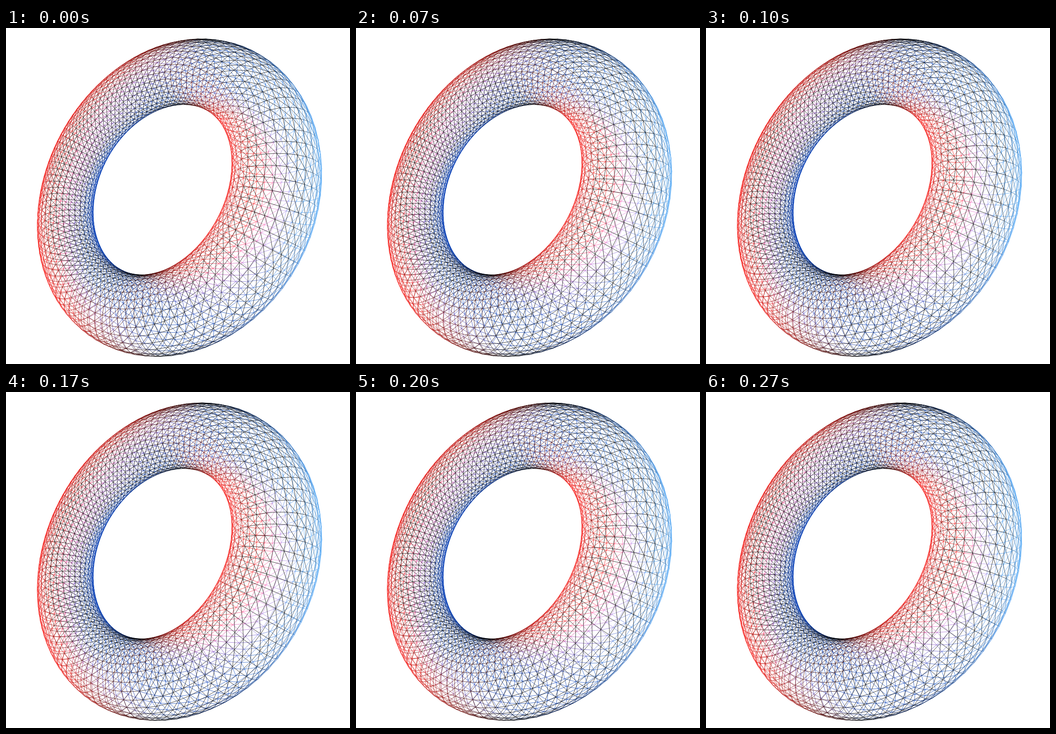
An HTML page with a canvas for the animation above (310 ms loop, 757 px wide and 740 px high).

```html
<!DOCTYPE html>
<html lang="en">
<head>
<meta charset="utf-8">
<title>Wireframe torus</title>
<style>
html, body { margin: 0; width: 100%; height: 100%; overflow: hidden; background: #fff; }
canvas { display: block; }
</style>
</head>
<body>
<canvas id="stage" width="757" height="740"></canvas>
<script>
const ctx = document.getElementById('stage').getContext('2d');
const TAU = 2 * Math.PI;

const LOOP = 310;
const STEPS = [0, 30, 70, 100, 130, 170, 200, 230, 270];

// Torus with ring radius 1, seen by a perspective camera on the z axis.
const RING = 94, TUBE = 30, TUBE_RADIUS = 0.263, PHASE = -0.21;
const DISTANCE = 2.6, FOCAL = 696, CENTER_X = 313, CENTER_Y = 338.7;
const TILT = 41.4 * Math.PI / 180, TURN = 27.6 * Math.PI / 180;

const cosTilt = Math.cos(TILT), sinTilt = Math.sin(TILT);
const cosTurn = Math.cos(TURN), sinTurn = Math.sin(TURN);
const nearAxis = [cosTilt * cosTurn, -cosTilt * sinTurn, sinTilt];
const sideAxis = [sinTurn, cosTurn, 0];
const spinAxis = [-sinTilt * cosTurn, sinTilt * sinTurn, cosTilt];

const clamp = (x, lo = 0, hi = 1) => Math.min(hi, Math.max(lo, x));
const mix = (a, b, t) => a + (b - a) * t;
const combine = (a, b, c) =>
  nearAxis.map((n, k) => a * n + b * sideAxis[k] + c * spinAxis[k]);

function vertex(theta, phi) {
  const ct = Math.cos(theta), st = Math.sin(theta);
  const cp = Math.cos(phi), sp = Math.sin(phi);
  const radius = 1 + TUBE_RADIUS * cp;
  const [x, y, z] = combine(radius * ct, radius * st, TUBE_RADIUS * sp);
  const normal = combine(cp * ct, cp * st, sp);
  const depth = DISTANCE - z;
  const scale = FOCAL / depth;

  // Split the normal into a part towards the eye and a part across the view.
  const length = Math.hypot(x, y, depth);
  const eye = [-x / length, -y / length, depth / length];
  const facing = normal.reduce((sum, n, k) => sum + n * eye[k], 0);
  const across = normal[0] - facing * eye[0];
  const up = normal[1] - facing * eye[1];
  const outward = (across * x + up * y) / Math.hypot(x, y);
  return { x: CENTER_X + x * scale, y: CENTER_Y - y * scale, facing, across, outward };
}

// A red light behind on the left and a blue one behind on the right.
function shade(p, q) {
  const mean = key => (p[key] + q[key]) / 2;
  const facing = mean('facing');
  const side = mean('across') + 0.6 * clamp(-facing) * Math.min(mean('outward'), 0);
  const red = clamp(-1.35 * side - 0.85 * facing);
  const blue = clamp(1.35 * side - 0.85 * facing);
  const pale = clamp((mean('x') - 470) / 210);
  const r = 245 * red + mix(10, 85, pale) * blue;
  const g = 28 * red + mix(65, 168, pale) * blue;
  const b = 24 * red + mix(182, 245, pale) * blue;
  return `rgb(${[r, g, b].map(c => Math.round(clamp(c, 0, 255)))})`;
}

function draw(spin) {
  const grid = [];
  for (let i = 0; i < RING; i++) {
    const row = [];
    for (let j = 0; j < TUBE; j++) row.push(vertex((i + spin) / RING * TAU, j / TUBE * TAU));
    grid.push(row);
  }
  const edges = [];
  for (let i = 0; i < RING; i++) {
    const row = grid[i], next = grid[(i + 1) % RING];
    for (let j = 0; j < TUBE; j++) {
      const k = (j + 1) % TUBE;
      edges.push([row[j], row[k]], [row[j], next[j]], [row[j], next[k]]);
    }
  }
  ctx.fillStyle = '#fff';
  ctx.fillRect(0, 0, 757, 740);
  ctx.lineWidth = 0.75;
  for (const front of [false, true]) {
    for (const [p, q] of edges) {
      if ((p.facing + q.facing > 0) !== front) continue;
      ctx.strokeStyle = shade(p, q);
      ctx.beginPath();
      ctx.moveTo(p.x, p.y);
      ctx.lineTo(q.x, q.y);
      ctx.stroke();
    }
  }
}

let shown = -1;
function tick() {
  const time = performance.now() % LOOP;
  const step = STEPS.filter(start => start <= time).length - 1;
  if (step !== shown) {
    draw(PHASE - step / STEPS.length);
    shown = step;
  }
  requestAnimationFrame(tick);
}
tick();
</script>
</body>
</html>
```
